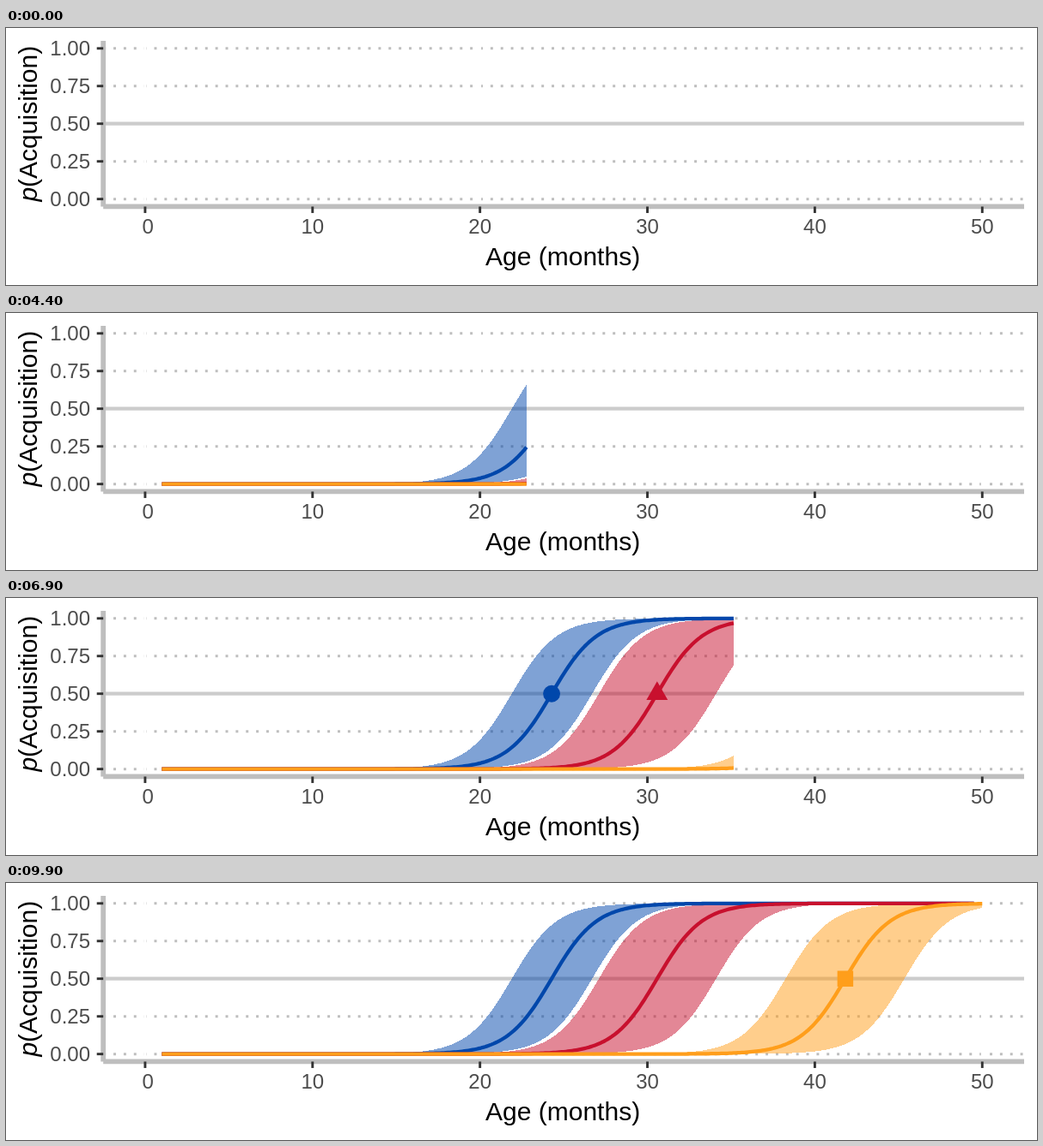
An HTML page that plays this animation: 1200x300 px, repeating every 10 s.

```html
<!DOCTYPE html>
<html lang="en">
<head>
<meta charset="utf-8">
<title>Acquisition by age</title>
<style>
  html, body { margin: 0; width: 100%; height: 100%; overflow: hidden; background: #fff; }
  svg { display: block; width: 100vw; height: 100vh; }
  text { font-family: "Liberation Sans", Arial, sans-serif; }
  .label { font-size: 24px; fill: #4d4d4d; }
  .title { font-size: 30px; fill: #000; text-anchor: middle; }
  .grid { stroke: #bebebe; stroke-width: 2.96; stroke-dasharray: 2.965 8.895; }
  .gap { stroke: #fff; stroke-width: 2.91; }
  .half { stroke: #ccc; stroke-width: 4.27; }
  .axis { stroke: #bebebe; stroke-width: 5.82; }
  .tick { stroke: #333; stroke-width: 2.91; }
  .band { fill-opacity: .5; shape-rendering: crispEdges; }
  .curve { fill: none; stroke-width: 4.27; stroke-linejoin: round; }
</style>
</head>
<body>
<svg id="stage" viewBox="0 0 1200 300"></svg>
<script>
const LOOP = 10000, STEP = 100, LAST = 99;
const FIRST_AGE = 1, LAST_AGE = 50, SLOPE = 0.75;
const LEFT = 113.2, RIGHT = 1185, TOP = 15, BOTTOM = 208.45;
const SIZE = 9.24; // marker radius

// mid, upper and lower are the ages at which each curve reaches 0.5
const series = [
  { color: '#0047ab', mid: 24.28, upper: 21.9, lower: 26.7, shape: 'circle', stays: false },
  { color: '#c8102e', mid: 30.58, upper: 27.1, lower: 34.1, shape: 'triangle', stays: false },
  { color: '#ff9e1b', mid: 41.82, upper: 38.25, lower: 45.35, shape: 'square', stays: true }
];

const stage = document.getElementById('stage');
const px = age => LEFT + (age + 2.5) / 55 * (RIGHT - LEFT);
const py = p => BOTTOM - (p + 0.05) / 1.1 * (BOTTOM - TOP);
const logistic = (age, mid) => 1 / (1 + Math.exp(-SLOPE * (age - mid)));
const ageAt = step => FIRST_AGE + (LAST_AGE - FIRST_AGE) * step / LAST;

function add(tag, attrs, content) {
  const el = document.createElementNS('http://www.w3.org/2000/svg', tag);
  for (const name in attrs) el.setAttribute(name, attrs[name]);
  if (content) el.textContent = content;
  stage.appendChild(el);
  return el;
}

const line = (cls, x1, y1, x2, y2) => add('line', { class: cls, x1, y1, x2, y2 });
const probs = [0, 0.25, 0.5, 0.75, 1], ages = [0, 10, 20, 30, 40, 50];

function drawGrid() {
  for (const p of probs) if (p !== 0.5) line('grid', LEFT, py(p), RIGHT, py(p));
  for (const a of ages) line('gap', px(a), TOP, px(a), BOTTOM);
  line('half', LEFT, py(0.5), RIGHT, py(0.5));
}

function drawAxes() {
  line('axis', LEFT, TOP, LEFT, BOTTOM);
  line('axis', LEFT, BOTTOM, RIGHT, BOTTOM);
  for (const p of probs) {
    line('tick', LEFT - 7.5, py(p), LEFT, py(p));
    add('text', { class: 'label', x: 98, y: py(p) + 8.6, 'text-anchor': 'end' }, p.toFixed(2));
  }
  for (const a of ages) {
    line('tick', px(a), BOTTOM, px(a), BOTTOM + 7.5);
    const shift = a ? 0 : 3.3;
    add('text', { class: 'label', x: px(a) + shift, y: 240, 'text-anchor': 'middle' }, String(a));
  }
  add('text', { class: 'title', x: (LEFT + RIGHT) / 2 - 1, y: 277 }, 'Age (months)');
  const title = add('text', { class: 'title', transform: 'translate(35.7 111.7) rotate(-90)' });
  title.innerHTML = '<tspan font-style="italic">p</tspan>(Acquisition)';
}

function addMarker({ shape, mid, color }) {
  const x = px(mid), y = py(0.5), fill = color;
  if (shape === 'circle') return add('circle', { cx: x, cy: y, r: SIZE + 0.7, fill });
  if (shape === 'square')
    return add('rect', { x: x - SIZE, y: y - SIZE, width: 2 * SIZE, height: 2 * SIZE, fill });
  const w = 1.3468 * SIZE, up = 1.5551 * SIZE, down = up / 2;
  return add('path', { d: `M${x} ${y - up}L${x + w} ${y + down}L${x - w} ${y + down}Z`, fill });
}

function points(mid, step) {
  const list = [];
  for (let i = 0; i <= step * 4; i++) {
    const age = ageAt(i / 4);
    list.push(px(age).toFixed(2) + ' ' + py(logistic(age, mid)).toFixed(2));
  }
  return list;
}

drawGrid();
for (const s of series) s.band = add('path', { class: 'band', fill: s.color });
for (const s of series) s.curve = add('path', { class: 'curve', stroke: s.color });
for (const s of series) s.marker = addMarker(s);
drawAxes();

function render(step) {
  for (const s of series) {
    // the first two groups finish one step early and lose their marker
    const done = step === LAST && !s.stays;
    const end = done ? LAST - 1 : step;
    const seen = end > 0;
    const edge = points(s.upper, end).concat(points(s.lower, end).reverse());
    s.band.setAttribute('d', seen ? 'M' + edge.join('L') + 'Z' : '');
    s.curve.setAttribute('d', seen ? 'M' + points(s.mid, end).join('L') : '');
    s.marker.style.display = !done && ageAt(step) >= s.mid ? '' : 'none';
  }
}

let shown = -1;
const start = performance.now();
function tick(now) {
  const step = Math.floor(Math.max(0, now - start) % LOOP / STEP);
  if (step !== shown) render(shown = step);
  requestAnimationFrame(tick);
}
render(0);
requestAnimationFrame(tick);
</script>
</body>
</html>
```
